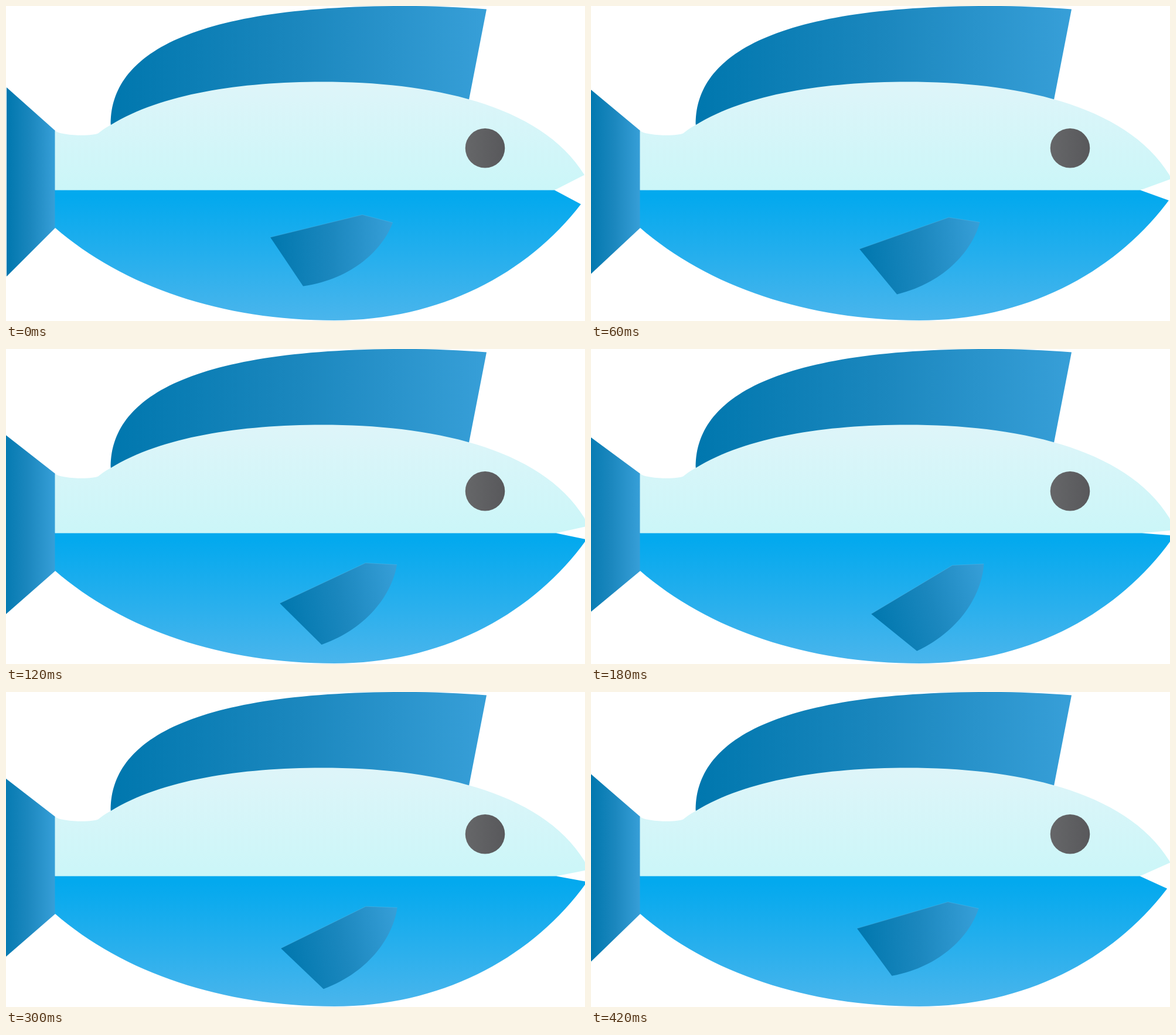
An HTML page with a canvas for the animation above (0.45 s loop, 988x538 px).

```html
<!DOCTYPE html>
<html lang="en">
<head>
<meta charset="utf-8">
<title>Swimming fish</title>
<style>
  html, body { margin: 0; width: 100%; height: 100%; overflow: hidden; background: #fff; }
  canvas { display: block; }
</style>
</head>
<body>
<canvas id="stage" width="988" height="538"></canvas>
<script>
const ctx = document.getElementById('stage').getContext('2d');
const STEP = 30, STEPS = 15, PEAK = 7;

function gradient(x0, y0, x1, y1, ...colors) {
  const g = ctx.createLinearGradient(x0, y0, x1, y1);
  colors.forEach((c, i) => g.addColorStop(i / (colors.length - 1), c));
  return g;
}

const finBlue = (x0, x1) => gradient(x0, 0, x1, 0, '#0077ae', '#1b87be', '#379fd8');
const paint = {
  dorsal: finBlue(180, 820),
  tail: finBlue(1, 84),
  side: finBlue(451, 660),
  back: gradient(0, 130, 0, 314, '#def5f9', '#cbf6f8'),
  belly: gradient(0, 325, 0, 537, '#03a9ee', '#4ab5ec'),
  eye: gradient(783, 0, 852, 0, '#666769', '#58585b')
};

const dorsal = new Path2D('M179 205C176 90 300 0 680 0C730 0 775 2 820 5.5L790 160L540 150L300 175Z');
const tail = new Path2D('M1 139L84 213V379L1 462Z');
const sideFin = new Path2D('M451 395L608 356.5L660 370C644 413 594 466 507 478.5Z');
const sideFinEdge = new Path2D('M451 395L608 356.5L660 370');

function fill(path, style) {
  ctx.fillStyle = style;
  ctx.fill(path);
}

function drawTail(p) {
  ctx.save();
  ctx.translate(84, 0);
  ctx.scale(1 + 0.24 * p, 1);
  ctx.translate(-84, 0);
  fill(tail, paint.tail);
  ctx.restore();
}

// The jaws meet as p reaches 1.
function drawBody(p) {
  const corner = 936 + 4.7 * p;
  const back = new Path2D(
    'M83.5 213C95 222 148 223 158 217C167 210 170 208 179 203' +
    'C265 150 400 129.5 540 129.5C720 129.5 912 166 987 288.5' +
    `L${987 + 9 * p} ${288.5 + 24.5 * p}L${corner} 314.5H83.5Z`);
  const belly = new Path2D(
    `M83.5 314.5H${corner}L${981 + 17 * p} ${338.5 - 23 * p}L981 338.5` +
    'C890 457 740 537 560 537C370 537 200 480 83.5 378.5Z');
  fill(back, paint.back);
  fill(belly, paint.belly);
}

function drawEye() {
  const eye = new Path2D();
  eye.arc(817.5, 242.8, 33.8, 0, Math.PI * 2);
  fill(eye, paint.eye);
}

function drawSideFin(p) {
  ctx.save();
  ctx.translate(655.3, 334.2);
  ctx.rotate(-20 * p * Math.PI / 180);
  ctx.translate(-655.3, -334.2);
  fill(sideFin, paint.side);
  ctx.strokeStyle = 'rgba(110, 190, 230, 0.4)';
  ctx.lineWidth = 0.8;
  ctx.stroke(sideFinEdge);
  ctx.restore();
}

function draw() {
  const step = Math.floor(performance.now() / STEP) % STEPS;
  const p = step <= PEAK ? step / PEAK : (STEPS - step) / (STEPS - PEAK);
  ctx.fillStyle = '#fff';
  ctx.fillRect(0, 0, 988, 538);
  fill(dorsal, paint.dorsal);
  drawTail(p);
  drawBody(p);
  drawEye();
  drawSideFin(p);
  requestAnimationFrame(draw);
}
draw();
</script>
</body>
</html>
```
